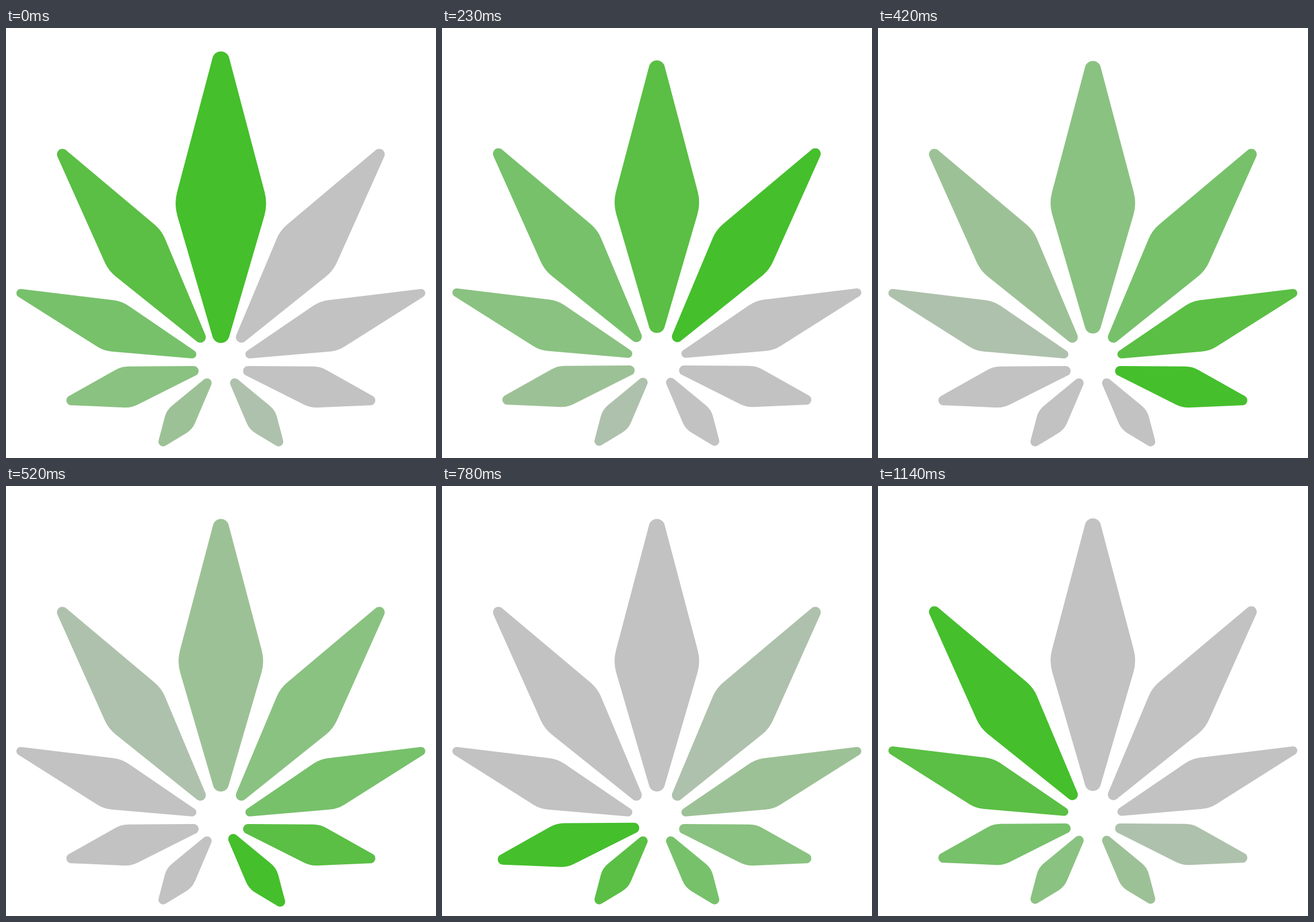
These frames come from a looping animation (748 px wide and 748 px high, 1170 ms). An HTML page with a canvas:

```html
<!DOCTYPE html>
<html>
<head>
<meta charset="utf-8">
<style>
html, body { margin: 0; height: 100%; overflow: hidden; background: #fff; }
canvas { display: block; }
</style>
</head>
<body>
<canvas id="stage" width="748" height="748"></canvas>
<script>
const ctx = document.getElementById('stage').getContext('2d');
const STEP = 130, COUNT = 9;
const HUB = { x: 373.75, y: 585.3 };
const TRAIL = ['#45bf2c', '#5abf44', '#77c16b', '#8ac281', '#9dc196', '#aec1ac'];
const REST = '#c2c2c2';

// Each leaf is a kite on a ray from the hub; its ends are rounded with radius cap.
function makeLeaf(degrees, tail, waist, tip, half, cap) {
  const corners = [[0, -tip, cap], [half, -waist], [0, -tail, cap], [-half, -waist]];
  const waistRadius = 20 + 0.095 * (tip - tail);
  const path = new Path2D();
  path.moveTo(-half / 2, -(tip + waist) / 2);
  corners.forEach(([x, y, r = waistRadius], i) => {
    const [nextX, nextY] = corners[(i + 1) % 4];
    path.arcTo(x, y, nextX, nextY, r);
  });
  path.closePath();

  // Distance from a sharp corner to the centre of its rounded cap.
  const inset = end => cap * Math.hypot(half, end - waist) / half;
  const middle = (tip - inset(tip) + tail + inset(tail)) / 2;
  return { angle: degrees * Math.PI / 180, path, middle };
}

// From the top down the right side; the left side mirrors it.
const LEAVES = [
  makeLeaf(0, 17.8, 279.8, 568.8, 76.3, 14),
  makeLeaf(37, 20.5, 248.1, 500.7, 57.9, 9.6),
  makeLeaf(70.4, 24.5, 199.6, 402.6, 46, 7.25),
  makeLeaf(103.5, 10.7, 169.1, 298.9, 36.9, 8.6),
  makeLeaf(143.2, 6.1, 120.4, 189.2, 28, 8.15)
];

function drawLeaf(i, color, scale) {
  const mirrored = i >= LEAVES.length;
  const { angle, path, middle } = LEAVES[mirrored ? COUNT - i : i];
  ctx.save();
  ctx.rotate(mirrored ? -angle : angle);
  ctx.translate(0, middle * (scale - 1));
  ctx.scale(scale, scale);
  ctx.fillStyle = color;
  ctx.fill(path);
  ctx.restore();
}

function draw(now) {
  const t = now % (STEP * COUNT);
  const lit = Math.floor(t / STEP), phase = t % STEP;
  ctx.fillStyle = '#fff';
  ctx.fillRect(0, 0, 748, 748);
  ctx.save();
  // The whole figure sits one pixel higher at the end of each step.
  ctx.translate(HUB.x, phase < 100 ? HUB.y : HUB.y - 1);
  for (let i = 0; i < COUNT; i++) {
    const age = (lit - i + COUNT) % COUNT;
    drawLeaf(i, TRAIL[age] || REST, age === 0 && phase < 30 ? 1.07 : 1);
  }
  ctx.restore();
}

let start;
function tick(now) {
  start ??= now;
  draw(now - start);
  requestAnimationFrame(tick);
}
draw(0);
requestAnimationFrame(tick);
</script>
</body>
</html>
```
